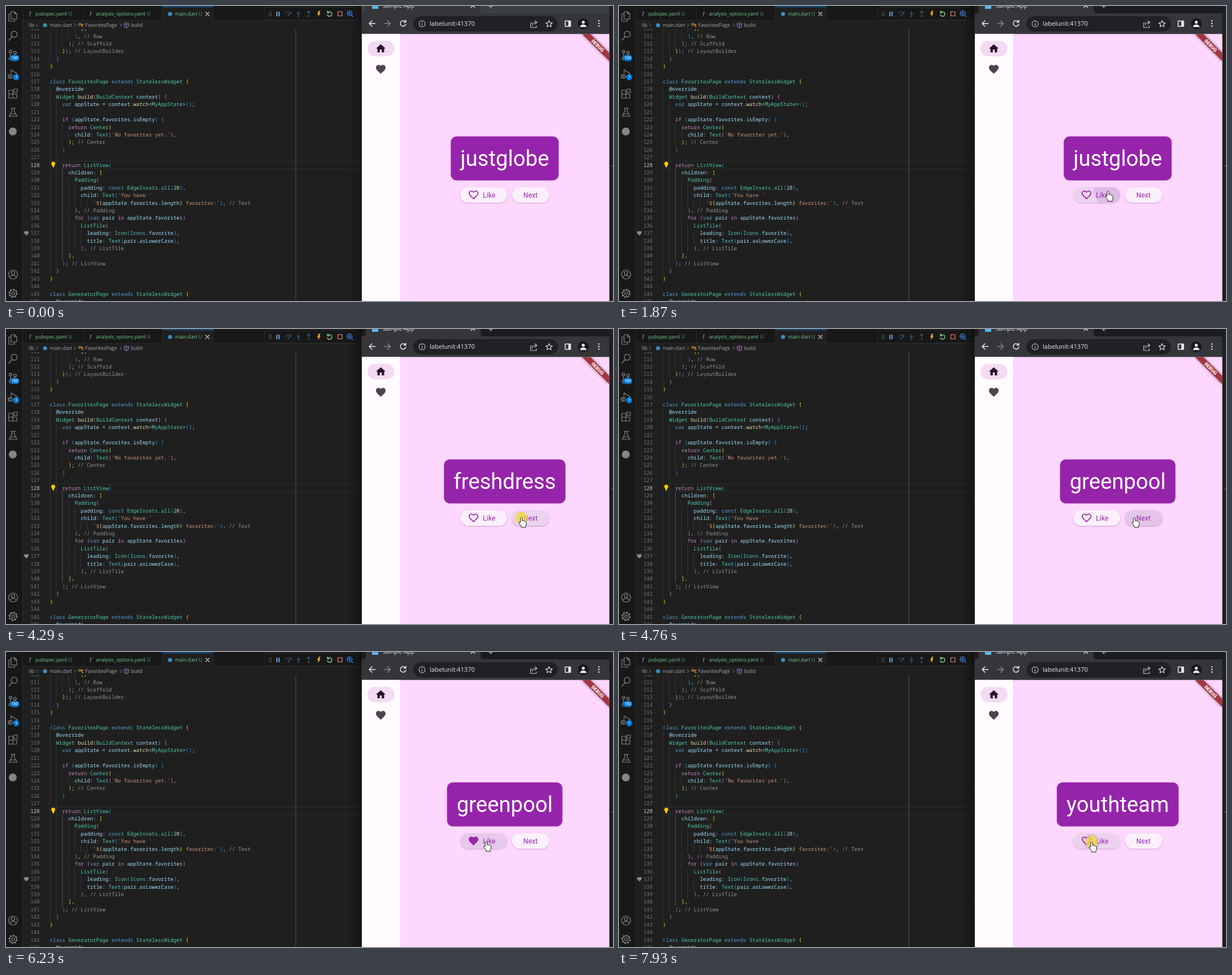
Animation of 1073x522 px, one loop 8 s. Source, as an HTML page:

```html
<!DOCTYPE html>
<html lang="en">
<head>
<meta charset="utf-8">
<title>Editor and app</title>
<style>
  html, body { margin: 0; width: 100%; height: 100%; overflow: hidden; background: #1f1f1f; }
  svg { display: block; width: 1073px; height: 522px; }
  text { white-space: pre; }
  .code { font: 500 9.1px "Noto Sans Mono", monospace; }
  .ui { font: 8.65px "Open Sans", sans-serif; }
  .app { font-family: Roboto, sans-serif; }
</style>
</head>
<body>
<svg id="stage" viewBox="0 0 1073 522" xmlns="http://www.w3.org/2000/svg"></svg>
<script>
const LOOP = 8000;
const PURPLE = '#9624ab';
const FIRST_LINE = 110;
const COL = 5.46, ROW = 13.41, CODE_X = 77.5;
const CARD_MID = 881.6;

const source = `          ],
        ), // Row
      ); // Scaffold
    }); // LayoutBuilder
  }
}

class FavoritesPage extends StatelessWidget {
  @override
  Widget build(BuildContext context) {
    var appState = context.watch<MyAppState>();

    if (appState.favorites.isEmpty) {
      return Center(
        child: Text('No favorites yet.'),
      ); // Center
    }

    return ListView(
      children: [
        Padding(
          padding: const EdgeInsets.all(20),
          child: Text('You have '
              '\${appState.favorites.length} favorites:'), // Text
        ), // Padding
        for (var pair in appState.favorites)
          ListTile(
            leading: Icon(Icons.favorite),
            title: Text(pair.asLowerCase),
          ), // ListTile
      ],
    ); // ListView
  }
}

class GeneratorPage extends StatelessWidget {
  @override`.split('\n');

// Drawing helpers
const esc = s => s.replace(/&/g, '&amp;').replace(/</g, '&lt;');
const rect = (x, y, w, h, fill, extra = '') =>
  `<rect x="${x}" y="${y}" width="${w}" height="${h}" fill="${fill}" ${extra}/>`;
const disc = (x, y, r, fill, extra = '') => `<circle cx="${x}" cy="${y}" r="${r}" fill="${fill}" ${extra}/>`;
const ring = (x, y, r, color, w = 1.2) => disc(x, y, r, 'none', `stroke="${color}" stroke-width="${w}"`);
const line = (d, color, w = 1.2) =>
  `<path d="${d}" fill="none" stroke="${color}" stroke-width="${w}" stroke-linecap="round" stroke-linejoin="round"/>`;
const shape = (d, fill, extra = '') => `<path d="${d}" fill="${fill}" ${extra}/>`;
const label = (x, y, s, fill, cls = 'ui', extra = '') =>
  `<text class="${cls}" x="${x}" y="${y}" fill="${fill}" ${extra}>${esc(s)}</text>`;
const at = (x, y, body, scale = 1) => `<g transform="translate(${x} ${y}) scale(${scale})">${body}</g>`;
const icon = (cx, cy, d, fill, id = '', scale = .849) =>
  at(cx - 12 * scale, cy - 12 * scale, shape(d, fill, id && `id="${id}"`), scale);

const HEART = 'M12 21.35l-1.45-1.32C5.4 15.36 2 12.28 2 8.5 2 5.42 4.42 3 7.5 3c1.74 0 3.41.81 4.5 2.09C13.09 3.81 14.76 3 16.5 3 19.58 3 22 5.42 22 8.5c0 3.78-3.4 6.86-8.55 11.54z';
const HEART_HOLE = 'M12.1 18.55l-.1.1-.11-.1C7.14 14.24 4 11.39 4 8.5 4 6.5 5.5 5 7.5 5c1.54 0 3.04.99 3.57 2.36h1.87C13.46 5.99 14.96 5 16.5 5c2 0 3.5 1.5 3.5 3.5 0 2.89-3.14 5.74-7.9 10.05z';
const HOME = 'M10 20v-6h4v6h5v-8h3L12 3 2 12h3v8z';
const HAND = 'M-1.7 1.6C-1.7-.5 1.6-.5 1.6 1.6V6c.6-.9 2.5-.6 2.7.5.7-.7 2.2-.4 2.4.7.7-.5 2 0 2 1.3V12c0 1.7-1 2.6-1.2 3.7v1.8H0V16C-.6 14.6-2.9 12-4.2 9.7c-.7-1.3 1-2.4 2-1.4l.5.6z';
const ARROW = 'M0 0V13l3-2.8 2 4.6 2-.9-2-4.5h4z';

// Code colouring
const TOKENS = /\/\/.*|'\$(?=\{)|(?<=\}) [^']*'|'[^']*'|@?\w+|[()[\]{}]|\s+|./g;
const BRACKETS = ['#ffd700', '#da70d6', '#179fff'];
let depth = 7;

function tokenColor(tok, rest) {
  if (tok.startsWith('//')) return '#929292';
  if (tok.includes("'")) return '#ce9178';
  if ('([{'.includes(tok)) return BRACKETS[depth++ % 3];
  if (')]}'.includes(tok)) return BRACKETS[--depth % 3];
  if (/^(class|extends|var|const)$/.test(tok)) return '#569cd6';
  if (/^(if|return|for|in)$/.test(tok)) return '#c586c0';
  if (/^\d/.test(tok)) return '#b5cea8';
  if (/^[A-Z]/.test(tok) || tok === 'all') return '#4ec9b0';
  if (/^\w/.test(tok) && /^[(<]/.test(rest)) return '#dcdcaa';
  return /^[@\w]/.test(tok) ? '#9cdcfe' : '#cccccc';
}

function codeLine(s, i) {
  const n = FIRST_LINE + i, mid = 53.4 + (i - 1) * ROW, base = mid + 3.2;
  const indent = s ? s.search(/\S/) : (n === 121 || n === 127 ? 4 : 0);
  let out = '';
  for (let c = 0; c < indent; c += 2) {
    const active = c === 4 && n > 128 && n < 141;
    out += rect(CODE_X + c * COL, mid - ROW / 2, .8, ROW, active ? '#6a6a6a' : '#3c3c3c');
  }
  const spans = [...s.trim().matchAll(TOKENS)].map(m => {
    const rest = m.input.slice(m.index + m[0].length);
    return `<tspan fill="${tokenColor(m[0], rest)}">${esc(m[0])}</tspan>`;
  }).join('');
  out += `<text class="code" x="${CODE_X + indent * COL}" y="${base}">${spans}</text>`;
  return out + label(59.5, base, String(n), n === 128 ? '#cccccc' : '#6e7681', 'code', 'text-anchor="end"');
}

function activityBar() {
  const c = '#868686';
  const badge = (x, y, w, s) => rect(x - w / 2, y - 5.5, w, 11, '#0078d4', 'rx="5.5"') +
    label(x, y + 2.4, s, '#fff', 'ui', 'text-anchor="middle" style="font-size:6.5px;font-weight:600"');
  return rect(0, 0, 29, 522, '#181818') + rect(29, 0, 1, 522, '#2b2b2b') +
    line('M9 10h6l4 4v9h-10zM15 10v4h4M9 14H5v13h10v-4', c) +
    ring(14.5, 50, 5.3, c) + line('M11 54L5 60.5', c, 1.4) +
    ring(8, 80.5, 2.4, c) + ring(16, 82.5, 2.4, c) + ring(8, 93, 2.4, c) + line('M8 83v7.5M16 85c0 3-4 3.5-8 4', c) +
    badge(15.5, 92, 16, '150') +
    line('M9 119v-6l11 7-7 5', c) + ring(8, 124.5, 3.2, c) + line('M3 121l2 2M3 125h2M3 129l2-2M8 121v7', c, 1) +
    badge(18, 126, 11, '1') +
    line('M5 149h7v7h7v7H5zM5 156h7v7M14 147h6v6h-6z', c) +
    line('M9 181h8M10.5 181v5l-5 9h14l-5-9v-5M8 191h9', c) +
    disc(12, 222, 7, c) +
    ring(12.5, 475, 8, c) + ring(12.5, 472.5, 3, c) + line('M7 480.5c1-5 10-5 11 0', c) +
    ring(12.5, 508.5, 2.5, c) + ring(12.5, 508.5, 6, c) +
    disc(12.5, 508.5, 7.2, 'none', `stroke="${c}" stroke-width="2" stroke-dasharray="2.8 2.85"`);
}

function tabs() {
  const green = '#73c991', grey = '#a9a9a9';
  const chevron = x => line(`M${x - 1.2} 31.5l2.4 2.5-2.4 2.5`, '#8a8a8a', .9);
  const bang = x => label(x, 17.5, '!', '#b180d7', 'ui', 'style="font-size:10px;font-weight:700;font-style:italic"');
  const status = x => label(x, 17.3, 'U', '#5b9a76');
  return rect(30, 0, 599, 25, '#181818') + rect(30, 25, 599, .8, '#2b2b2b') +
    rect(276, 1, 91, 25, '#1f1f1f') + rect(276, 1, 91, 1, '#0078d4') +
    [137, 276, 367].map(x => rect(x - .5, 1, .8, 25, '#2b2b2b')).join('') +
    bang(41) + label(52, 17.3, 'pubspec.yaml', green) + status(110.5) +
    bang(148) + label(159, 17.3, 'analysis_options.yaml', green) + status(249.5) +
    disc(290, 14, 3.6, '#3a8fc4') + label(299, 17.3, 'main.dart', green) + status(340.5) +
    line('M353 11l6 6M359 11l-6 6', '#e0e0e0', 1.1) +
    label(40.5, 37.2, 'lib', grey) + chevron(55) + disc(69, 34, 3.6, '#3a8fc4') +
    label(77.5, 37.2, 'main.dart', grey) + chevron(122) +
    line('M129 31h4v3h-4zM133 32.5h4M134.5 32.5v4h2.5', '#ee9d28', 1) +
    label(140, 37.2, 'FavoritesPage', grey) + chevron(203) +
    line('M213 29.5l4 2v5l-4 2-4-2v-5zM209 31.5l4 2 4-2M213 33.5v5', '#b180d7', .9) + label(221, 37.2, 'build', grey);
}

function debugBar() {
  const dim = '#355d7b', blue = '#75beff';
  let grip = '';
  for (let i = 0; i < 6; i++) grip += disc(465.5 + (i % 2) * 3, 11 + (i >> 1) * 3, .8, '#8a8a8a');
  return rect(457, 2, 163, 23, '#181818', 'rx="3" stroke="#303030" stroke-width=".8"') + grip +
    line('M478.8 10.5v7M482.6 10.5v7', blue, 1.7) +
    line('M494.5 14c1-5 7-5 9 0M503.5 10v4h-4', dim) + disc(499, 17, 1.4, dim) +
    line('M517 9v6M514.5 12.5l2.5 2.5 2.5-2.5', dim) + disc(517, 18, 1.4, dim) +
    line('M535 15v-6M532.5 11.5L535 9l2.5 2.5', dim) + disc(535, 18, 1.4, dim) +
    shape('M553 8.5l-3 6h2.5l-1.5 5 5-6.5h-2.5l2.5-4.5z', '#ffb02e') +
    line('M568.5 11.5a4.2 4.2 0 1 1 -.6 4M568.3 9v3h3', '#89d185', 1.4) +
    line('M586.5 10h7.5v7.5h-7.5z', '#f48771') +
    ring(607.5, 13, 4.3, '#3794ff', 1.3) + line('M610.5 16l3 3M605.5 13h4M607.5 11v4', '#3794ff', 1.3);
}

function browser() {
  const white = '#e8eaed', grey = '#85878b';
  return rect(603, 0, 25.5, 522, 'url(#edge)', 'id="shade"') + rect(1066, 0, 7, 522, '#1f1f1f') +
    rect(1070, 282.5, 3, 1, '#777') +
    rect(628.5, 0, 438, 14, '#1b1c1f', 'id="strip"') +
    shape('M629 13.5c5 0 7-2 7-6V0H839v7.5c0 4 3 6 7 6z', '#35363a') + rect(628.5, 13, 438, 37, '#35363a') +
    rect(647, -6, 11, 11, '#54b9ee') + label(666, 3, 'Sample App', white, 'ui', 'style="font-size:10px"') +
    line('M822 -4l6.5 6.5M828.5 -4L822 2.5', white) + line('M857 -4v7.5M853 0h8', white) +
    line('M652.5 31h-10M647 26l-5 5 5 5', white, 1.5) + line('M669 31h10.5M674.5 26l5 5-5 5', grey, 1.5) +
    line('M706 28a4.9 4.9 0 1 0 .7 4M706.8 25v3.5h-3.5', white, 1.5) +
    rect(720, 18, 255.5, 27, '#202124', 'rx="13.5"') +
    ring(735.5, 31.5, 5.4, '#b4b6ba') + line('M735.5 31v3M735.5 28.7v.1', '#b4b6ba', 1.3) +
    label(749, 35.4, 'labelunit:41370', white, 'ui', 'style="font-size:11.1px"') +
    line('M930 30h-2.5v8h10v-3M930.5 34c0-4 3-5 7-5M935 26l3.5 3-3.5 3', '#c3c5c8', 1.1) +
    line('M960 25.8l1.7 3.8 4.2.4-3.2 2.7 1 4.1-3.7-2.2-3.7 2.2 1-4.1-3.2-2.7 4.2-.4z', white, 1.1) +
    line('M988.5 26.5h9.5v9.5h-9.5z', white, 1.5) + rect(994, 26.5, 4, 9.5, white) +
    disc(1020.5, 31.5, 9.5, '#17181a') + disc(1020.5, 28.8, 2.7, white) +
    shape('M1014.8 37.2c0-6 11.4-6 11.4 0z', white) +
    [26.5, 31, 35.5].map(y => disc(1048, y, 1.3, white)).join('');
}

function button(id, x, w, body) {
  const pill = `x="${x}" y="320.7" width="${w}" height="27.2" rx="13.6"`;
  return `<clipPath id="${id}Clip"><rect ${pill}/></clipPath>` +
    `<rect ${pill} id="${id}Shadow" transform="translate(0 1)" fill="#5a2860" filter="url(#soft)"/>` +
    `<rect ${pill} fill="#fbf0fc"/><rect ${pill} id="${id}Hover" fill="#ebd3ee"/>` +
    `<g clip-path="url(#${id}Clip)">${disc(0, 0, 0, PURPLE, `id="${id}Splash"`)}</g>` + body;
}

function app() {
  const caption = 'font-size="11.9" letter-spacing=".2"';
  const banner = rect(-34, 23.8, 68, 10.2, '#000', 'opacity=".5" filter="url(#blur)"') +
    rect(-45, 23.8, 90, 10.2, '#a3363f') +
    label(0, 32, 'DEBUG', '#fff', 'app', 'font-size="8.6" font-weight="900" text-anchor="middle"');
  return rect(629, 49.5, 437.5, 472.5, '#fdd7fe') + rect(629, 49.5, 67.5, 472.5, '#fffbff') +
    rect(639, 61.7, 47.5, 27.2, '#f4daf2', 'rx="13.6"') +
    icon(662.5, 75.3, HOME, '#28132a') + icon(662.5, 112, HEART, '#4b444c') +
    `<g clip-path="url(#page)"><g transform="translate(1066.5 49.5) rotate(45)">${banner}</g></g>` +
    rect(786, 231.5, 191, 77.5, '#6a3a70', 'id="cardShadow" rx="10.2" opacity=".25" filter="url(#soft)"') +
    rect(786, 230.8, 191, 77.8, PURPLE, 'id="card" rx="10.2"') +
    label(CARD_MID, 282.9, '', '#fff', 'app', 'id="word" font-size="38.2" text-anchor="middle"') +
    button('like', 803, 83, icon(826.5, 334.3, '', PURPLE, 'heart') +
      label(843, 338.5, 'Like', PURPLE, 'app', caption)) +
    button('next', 894.5, 66, label(927.2, 338.5, 'Next', PURPLE, 'app', caption + ' text-anchor="middle"'));
}

const defs = `<defs>
  <filter id="soft" x="-20%" y="-50%" width="140%" height="200%"><feGaussianBlur stdDeviation="1.1"/></filter>
  <filter id="blur" x="-20%" y="-100%" width="140%" height="300%"><feGaussianBlur stdDeviation="2.5"/></filter>
  <linearGradient id="edge"><stop offset="0" stop-opacity="0"/><stop offset="1" stop-opacity=".35"/></linearGradient>
  <clipPath id="page"><rect x="696" y="49.5" width="370.5" height="472.5"/></clipPath></defs>`;

document.getElementById('stage').innerHTML = defs + rect(0, 0, 1073, 522, '#1f1f1f') +
  rect(77, 274.3, 551, .8, '#303030') + rect(77, 287.3, 551, .8, '#303030') +
  rect(511.9, 41, .9, 481, '#5a5a5a') + source.map(codeLine).join('') +
  rect(30, 0, 599, 41, '#1f1f1f') + activityBar() + tabs() + debugBar() +
  icon(36, 402, HEART, '#8a8a8a', '', .42) +
  disc(83.5, 279, 3.4, '#ffcc00') + rect(81.9, 281.5, 3.2, 3.8, '#ffcc00', 'rx=".8"') +
  browser() + app() + disc(0, 0, 11, '#f0d83c', 'id="glow" opacity=".75"') +
  shape('', '#fff', 'id="cursor" stroke="#151515" stroke-width="1" stroke-linejoin="round"');

// Timeline
const el = id => document.getElementById(id);
const clamp = v => Math.max(0, Math.min(1, v));
const ease = v => v * v * (3 - 2 * v);

const path = [
  [510, 1002, 472], [1270, 864.5, 328], [2870, 864.5, 328], [3030, 911, 333.5], [5130, 911, 333.5],
  [5300, 869.5, 333.5], [5500, 829, 335], [6120, 829, 335], [6450, 904, 335.5], [7300, 904, 335.5],
  [7760, 835.5, 336.5], [8000, 835.5, 336.5]
];
const hovers = {
  like: [[1130, 2940], [5360, 6330], [7570, 9000]],
  next: [[2960, 5320], [6330, 7470]]
};
const presses = [
  [1590, 'like'], [3410, 'next'], [4290, 'next'], [5690, 'like'], [6580, 'next'], [7130, ''], [7860, 'like']
];
const words = [[0, 'justglobe'], [3700, 'freshdress'], [4590, 'greenpool'], [6860, 'youthteam']];
const liked = [[1950, 3700], [5980, 6860]];
const within = (t, spans) => spans.some(([a, b]) => t >= a && t < b);

function cursorAt(t) {
  const i = path.findIndex(p => p[0] > t);
  const [t0, x0, y0] = path[i - 1], [t1, x1, y1] = path[i];
  const k = ease((t - t0) / (t1 - t0));
  return [x0 + (x1 - x0) * k, y0 + (y1 - y0) * k];
}

function set(id, attrs) {
  for (const k in attrs) el(id).setAttribute(k, attrs[k]);
}

let shown = '';
function showWord(t) {
  const word = words.filter(w => w[0] <= t).pop()[1];
  if (word === shown) return;
  shown = word;
  el('word').textContent = word;
  const width = el('word').getComputedTextLength() + 34;
  for (const id of ['card', 'cardShadow']) set(id, { x: CARD_MID - width / 2, width });
}

function draw(t) {
  const visible = t >= 510;
  const [x, y] = visible ? cursorAt(t) : [0, 0];
  const press = presses.filter(p => p[0] <= t).pop();
  const age = press ? t - press[0] : Infinity;
  const focused = t >= 1590;

  set('strip', { fill: focused ? '#1b1c1f' : '#3c4043' });
  set('shade', { opacity: focused ? 1 : .7 });
  showWord(t);
  set('heart', { d: within(t, liked) ? HEART : HEART + HEART_HOLE, 'fill-rule': 'evenodd' });

  for (const id in hovers) {
    const hover = Math.max(...hovers[id].map(([a, b]) => Math.min(clamp((t - a) / 180), clamp((b + 150 - t) / 150))));
    set(id + 'Hover', { opacity: hover });
    set(id + 'Shadow', { opacity: .28 + hover * (id === 'next' ? .15 : 0) });
    const on = press && press[1] === id && age < 650;
    const r = 11 + Math.min(age, 300) * .05 + clamp((age - 300) / 250) * 55;
    set(id + 'Splash', on
      ? { cx: x, cy: y, r, opacity: .14 * clamp(age / 50) * clamp((650 - age) / 300) }
      : { opacity: 0 });
  }

  set('glow', { cx: x, cy: Math.min(y + .8, 335.5), visibility: age < 210 ? 'visible' : 'hidden' });
  const overButton = y < 348 && y > 320 && x > 803 && x < 960 && !(x > 886 && x < 894.5);
  set('cursor', {
    d: overButton ? HAND : ARROW,
    transform: `translate(${x} ${y})`,
    visibility: visible ? 'visible' : 'hidden'
  });
}

const start = performance.now();
function tick() {
  draw((performance.now() - start) % LOOP);
  requestAnimationFrame(tick);
}
tick();
</script>
</body>
</html>
```
